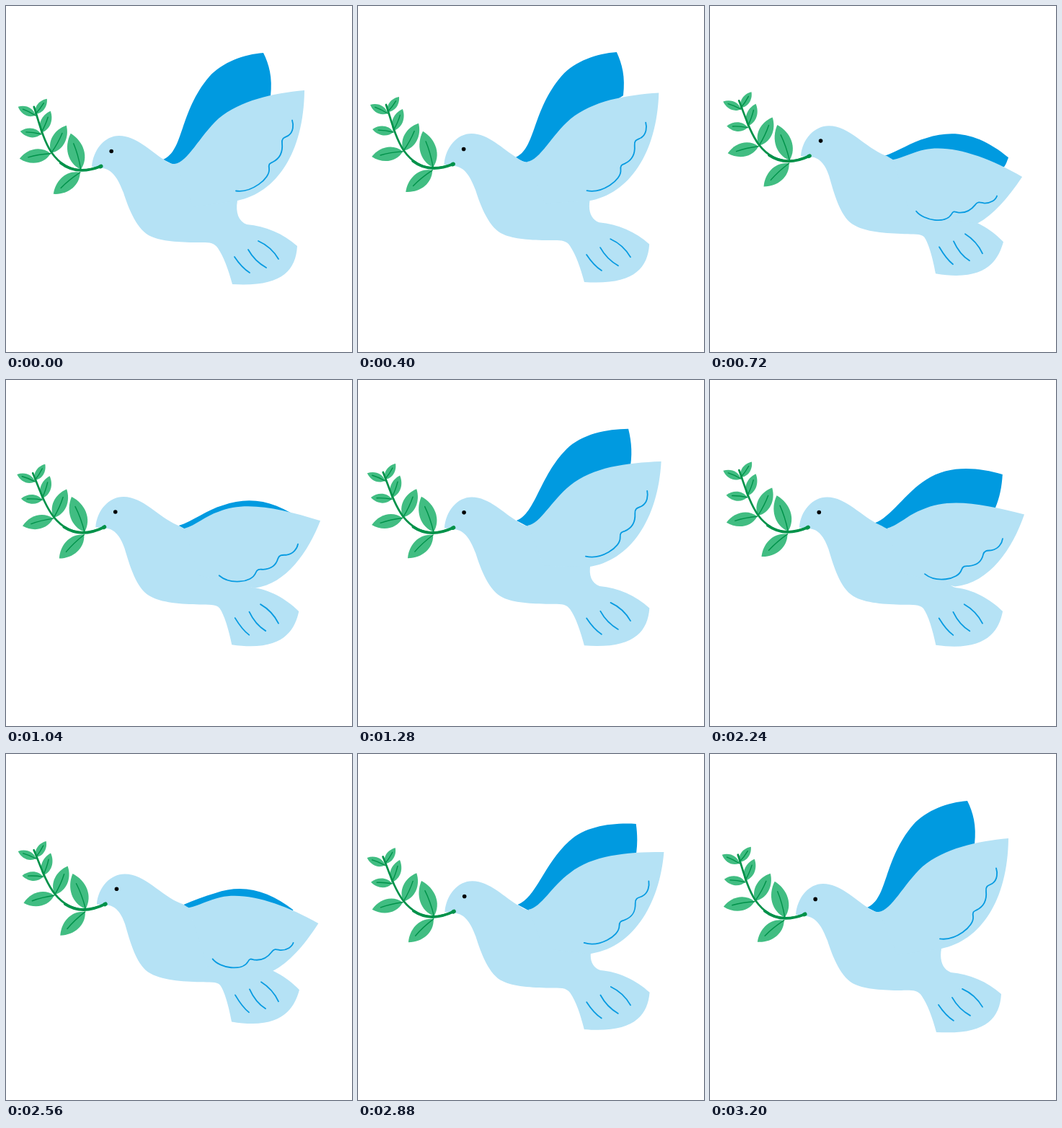
An HTML page that plays this animation: 480x480 px, repeating every 3280 ms.

```html
<!DOCTYPE html>
<html>
<head>
<meta charset="utf-8">
<style>
  html, body { margin: 0; height: 100%; overflow: hidden; background: #fff; }
  svg { display: block; width: 100%; height: 100%; }
  .light { fill: #b5e2f5; }
  .line { fill: none; stroke: #079be1; stroke-width: 1.8; stroke-linecap: round; }
  .stem { fill: none; stroke: #00924a; stroke-linecap: round; }
  .leaf { fill: #41bd82; }
</style>
</head>
<body>
<svg viewBox="0 0 480 480">
  <g id="bird">
    <path id="far" fill="#009ae0"/>
    <path id="body" class="light"/>
    <path id="near" class="light"/>
    <path id="feather" class="line" transform="translate(0 -1.5)"/>
    <path id="tail" class="line"/>
    <circle id="eye" r="2.8"/>
    <g id="branch">
      <g id="leaves"></g>
      <path class="stem" stroke-width="2.7" d="M132 204C100 217 78 208 62 185C50 166 45 143 38 122"/>
      <path class="stem" stroke-width="3.8" d="M131 204.500C107 214 89 211 75 200"/>
      <path class="stem" stroke-width="5.4" d="M131 204.500L130 205"/>
    </g>
  </g>
</svg>
<script>
const LOOP = 3280, FLAP = LOOP / 2, STEP = 80;
const $ = id => document.getElementById(id);

// Poses run from wing raised to wing lowered; "at" holds the flap amount of each.
const shapes = {
  body: { at: [0, .96], poses: [
    'M119 204C121 180 137 161 157 161C180 161 200 182 219 194C224 198 228 200 234 200L321 251C318 268 323 280 334 284C360 286 385 297 404 314C402 350 380 371 314 367C308 345 302 329 294 317C288 308 280 309 265 309C240 309 215 307 202 301C182 293 170 262 163 240C156 222 148 207 133 206Z',
    'M126 197C128 173 145 155 165 155C193 155 215 185 243 196C247 197 250 200 254 202L335 268C330 275 335 280 345 282C365 284 390 298 407 316C400 340 385 372 313 360C309 338 303 317 297 309C292 304 282 306 270 305C245 304 215 303 197 291C180 279 172 248 165 224C160 209 152 198 138 198Z'] },
  near: { at: [0, .66, .96], poses: [
    'M234 200C252 198 268 162 295 137C325 112 370 102 414 98C413 185 375 240 321 251L260 260Z',
    'M246 200C262 196 275 181 295 174C330 157 380 166 436 181C420 228 388 276 340 281L265 262Z',
    'M254 202C268 199 283 191 298 188C335 181 385 198 433 226C413 256 393 278 372 290L280 285Z'] },
  feather: { at: [0, .66, .96], poses: [
    'M319 239C340 242 367 222 365 208C364 201 366 201 370 199C382 193 384 183 383 173C382 164 388 165 392 162C399 157 399 147 397 141',
    'M298 265C313 277 344 274 349 259C351 253 355 254 359 254C371 253 377 247 379 238C381 231 387 233 391 232C400 230 405 223 406 216',
    'M286 275C296 288 327 293 335 279C338 273 341 277 345 277C357 278 364 271 368 266C372 260 377 264 381 264C389 264 396 260 398 254'] },
  tail: { at: [0, .96], poses: [
    'M317 329Q327 344 338 351M336 319Q345 335 361 344M350 307Q368 315 378 332',
    'M318 323Q328 340 337 347M338 315Q346 333 360 342M354 305Q370 315 378 332'] },
  far: { at: [0, .52, .89], poses: [
    'M218 194C247 182 240 128 282 79C300 59 330 48 357 46C365 62 370 80 367 106L300 150L238 204Z',
    'M228 193C250 186 272 150 300 133C330 113 370 115 406 126C405 143 402 158 396 172L310 185L248 204Z',
    'M241 197C260 191 280 177 300 172C340 159 375 167 414 199C412 204 411 208 408 212L320 205L256 205Z'] }
};
const folded = 'M246 198C260 192 275 186 290 182C330 168 365 180 398 205C397 206 396 207 395 208L320 208L256 206Z';

// Base and tip of each leaf
const leaves = [
  [40, 132, 56, 111], [40, 134, 16, 122], [48, 158, 61, 128], [48, 160, 19, 156],
  [62, 186, 83, 148], [61, 187, 18, 194], [103, 209, 89, 159], [102, 213, 65, 243]
];
$('leaves').innerHTML = leaves.map(([x, y, u, v]) => {
  const size = Math.hypot(u - x, v - y), turn = Math.atan2(v - y, u - x) * 180 / Math.PI;
  return `<g transform="translate(${x} ${y}) rotate(${turn}) scale(${size})">
    <path class="leaf" d="M0 0C.25 .3 .7 .28 1 0C.7 -.28 .25 -.3 0 0"/>
    <path class="stem" stroke-width="${1.4 / size}" d="M0 0Q.4 .04 .72 0"/></g>`;
}).join('');

const ease = (a, b, t) => {
  const u = Math.min(1, Math.max(0, (t - a) / (b - a)));
  return u * u * u * (u * (6 * u - 15) + 10);
};

// Smooth curve through all poses, number by number
function blend(poses, at, w) {
  const weights = at.map((a, i) => at.reduce((k, b, j) => i === j ? k : k * (w - b) / (a - b), 1));
  const lists = poses.map(s => s.match(/[\d.]+/g));
  let n = 0;
  return poses[0].replace(/[\d.]+/g, () => {
    const v = lists.reduce((sum, list, i) => sum + list[n] * weights[i], 0);
    n++;
    return v.toFixed(2);
  });
}

function draw(now) {
  const t = Math.floor(now % LOOP / STEP) * STEP, p = t % FLAP;
  const w = ease(300, 811, p) - ease(790, 1452, p);
  const farW = ease(340, 851, p) - ease(880, 1440, p);
  for (const id of ['body', 'near', 'feather', 'tail'])
    $(id).setAttribute('d', blend(shapes[id].poses, shapes[id].at, w));

  let far = blend(shapes.far.poses, shapes.far.at, Math.min(farW, .89));
  if (farW > .89) far = blend([far, folded], [.89, 1], farW);
  $('far').setAttribute('d', far);

  $('eye').setAttribute('cx', 146.2 + 7.7 * w);
  $('eye').setAttribute('cy', 182.5 - 7 * w);
  const sway = -4.6 * (ease(300, 950, p) - ease(1100, 1600, p));
  $('branch').setAttribute('transform', `translate(${.8 + 6.5 * w} ${-1.2 - 7 * w}) rotate(${sway} 132 204)`);
  const drop = 9.5 * (1 + Math.cos(2 * Math.PI * t / LOOP));
  $('bird').setAttribute('transform', `translate(0 ${drop})`);
}

const start = performance.now();
function tick() {
  draw(performance.now() - start);
  requestAnimationFrame(tick);
}
tick();
</script>
</body>
</html>
```
